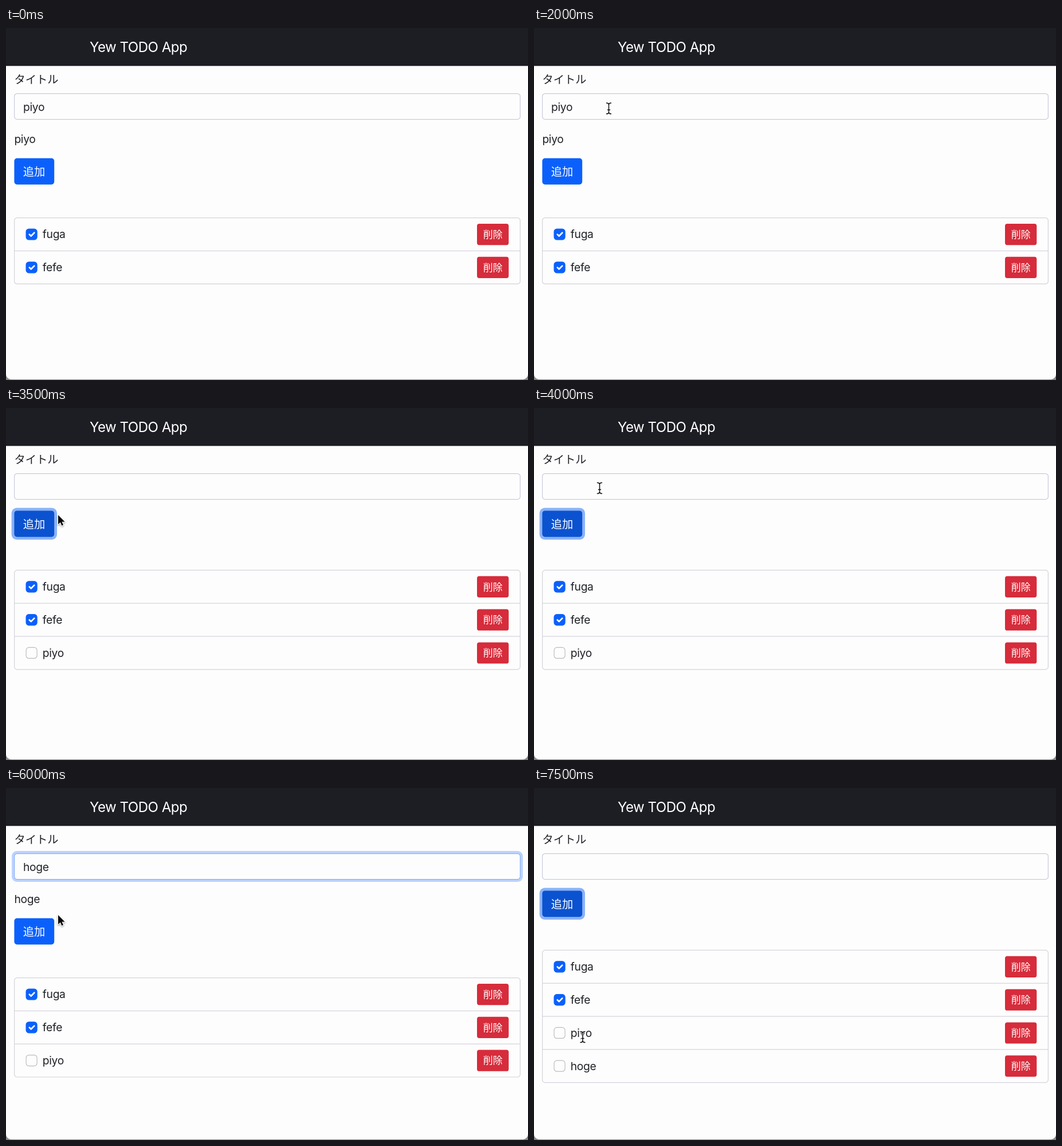
These frames come from a looping animation (911x615 px, 8000 ms). An HTML page with a canvas:

```html
<!DOCTYPE html>
<html lang="ja">
<head>
<meta charset="utf-8">
<title>Yew TODO App</title>
<style>
html, body { margin: 0; width: 100%; height: 100%; overflow: hidden; background: #fdfdfd; }
canvas { display: block; width: 911px; height: 615px; }
</style>
</head>
<body>
<canvas id="stage"></canvas>
<script>
const W = 911, H = 615, LOOP = 8000, STEP = 500;
const REM = 19.3, ROW = 57.8, SHIFT = 48.2;
const FONT = 'Inter, "Noto Sans CJK JP", "Noto Sans CJK", sans-serif';
const CJK = '"Noto Sans CJK JP", "Noto Sans CJK", sans-serif';
const INK = '#1f2126', BLUE = '#0b60fc', DARK_BLUE = '#0a52cf', RED = '#d62c3b';

const canvas = document.getElementById('stage');
const dpr = window.devicePixelRatio || 1;
canvas.width = W * dpr;
canvas.height = H * dpr;
const ctx = canvas.getContext('2d');

// Each entry overrides the state from its time on.
const steps = [
  [0, { title: 'piyo', items: ['fuga', 'fefe'], focus: 0, caret: false, hover: false, ring: false, cursor: null }],
  [1500, { cursor: ['beam', 130.5, 140.5] }],
  [2500, { focus: 1, caret: true }],
  [3000, { focus: 0.9, caret: false, hover: true, cursor: ['hand', 56, 240] }],
  [3500, { title: '', items: ['fuga', 'fefe', 'piyo'], focus: 0, ring: true, cursor: ['arrow', 91, 187] }],
  [4000, { cursor: ['beam', 114.5, 140] }],
  [4500, { focus: 1, caret: true, hover: false, ring: false }],
  [5500, { title: 'hoge', cursor: null }],
  [6000, { caret: false, cursor: ['arrow', 91, 222] }],
  [6500, { hover: true, cursor: ['hand', 56, 240] }],
  [7000, { title: '', items: ['fuga', 'fefe', 'piyo', 'hoge'], focus: 0, ring: true, cursor: ['arrow', 80, 268] }],
  [7500, { cursor: ['beam', 85, 435] }]
];

function stateAt(t) {
  const s = {};
  for (const [start, change] of steps) if (t >= start) Object.assign(s, change);
  return s;
}

function box(x, y, w, h, r, fill, stroke) {
  ctx.beginPath();
  ctx.roundRect(x, y, w, h, r);
  if (fill) { ctx.fillStyle = fill; ctx.fill(); }
  if (stroke) { ctx.strokeStyle = stroke; ctx.lineWidth = 1.2; ctx.stroke(); }
}

function text(str, x, y, size = REM, color = INK, family = FONT, spacing = -0.018) {
  ctx.font = `400 ${size}px ${family}`;
  ctx.letterSpacing = `${family === CJK ? 0 : size * spacing}px`;
  ctx.fillStyle = color;
  ctx.fillText(str, x, y);
}

function drawInput(s) {
  if (s.focus) box(10, 110, 892, 54, 9, `rgba(13,96,252,${0.27 * s.focus})`);
  box(14.6, 114.6, 882.8, 45, 4.8, '#fdfdfd', s.focus ? '#86b0f8' : '#c9cbdc');
  text(s.title, 30, 144.5);
  if (s.caret) {
    const x = s.title ? 31 + ctx.measureText(s.title).width : 30;
    ctx.fillStyle = '#111';
    ctx.fillRect(x, 126, 1.2, 23);
  }
}

function drawAdd(s, y) {
  if (s.ring) box(9.6, y - 4.8, 79.4, 55.4, 9, '#8bb2f8');
  box(14.4, y, 69.8, 45.8, 4.8, s.hover ? DARK_BLUE : BLUE);
  text('追加', 29.8, y + 30.3, REM, '#fff', CJK);
}

function drawCheckbox(x, y, on) {
  box(x, y, 19, 19, 4.8, on ? BLUE : '#fdfdfd', on ? BLUE : '#bdbdc2');
  if (!on) return;
  ctx.beginPath();
  ctx.moveTo(x + 5.7, y + 9.6);
  ctx.lineTo(x + 8.6, y + 12.5);
  ctx.lineTo(x + 14.2, y + 6.8);
  ctx.strokeStyle = '#fff';
  ctx.lineWidth = 2.7;
  ctx.lineCap = ctx.lineJoin = 'round';
  ctx.stroke();
}

function drawList(items, top) {
  box(14.6, top, 882.8, ROW * items.length, 4.8, null, '#d3d3dc');
  items.forEach((name, i) => {
    const y = top + ROW * i;
    if (i) {
      ctx.fillStyle = '#d3d3dc';
      ctx.fillRect(14.6, y - 0.6, 882.8, 1.2);
    }
    drawCheckbox(35.1, y + 19.4, i < 2);
    text(name, 63.8, y + 35.7);
    box(822, y + 10.4, 55.3, 37.2, 3.9, RED);
    text('削除', 832.8, y + 35.2, 16.9, '#fff', CJK);
  });
}

const arrowPath = new Path2D('M0 0V16.2L3.8 12.7L6.4 18.5L9 17.3L6.5 11.7H11.6Z');
const beamPath = new Path2D('M-4 -9.5Q-.5 -9.5 0 -7Q.5 -9.5 4 -9.5M0 -7V7M-4 9.5Q-.5 9.5 0 7Q.5 9.5 4 9.5M-2 2.5H2');
const handPath = new Path2D('M5 12L1.8 3.2Q1.2 1 3 .8Q4.3 .7 5 2.4L7.2 7.4Q8 5.9 9.6 7Q11 5.9 12.2 7.4Q13.8 6.3 15 8Q17.2 7.6 17.3 10Q17.4 14 15.5 17V19.3H7.8V17.7Q5.6 15.7 3.9 13Q1 11 1.5 9.5Q2.6 8.6 5 12Z');
const fingerPath = new Path2D('M9 11V16M11.5 11V16M14 11V16');

function drawCursor([kind, x, y]) {
  ctx.save();
  ctx.translate(x, y);
  ctx.lineCap = ctx.lineJoin = 'round';
  if (kind === 'beam') {
    ctx.strokeStyle = '#fff';
    ctx.lineWidth = 3.4;
    ctx.stroke(beamPath);
    ctx.strokeStyle = '#111';
    ctx.lineWidth = 1.5;
    ctx.stroke(beamPath);
  } else {
    const hand = kind === 'hand', path = hand ? handPath : arrowPath;
    ctx.shadowColor = 'rgba(0,0,0,.35)';
    ctx.shadowBlur = 3 * dpr;
    ctx.shadowOffsetY = 1.5 * dpr;
    ctx.strokeStyle = hand ? '#111' : '#fff';
    ctx.lineWidth = hand ? 1.4 : 2.2;
    ctx.stroke(path);
    ctx.shadowColor = 'transparent';
    ctx.fillStyle = hand ? '#fff' : '#080808';
    ctx.fill(path);
    if (hand) {
      ctx.stroke(path);
      ctx.stroke(fingerPath);
    }
  }
  ctx.restore();
}

function draw(t) {
  const s = stateAt(t), dy = s.title ? SHIFT : 0;
  ctx.setTransform(dpr, 0, 0, dpr, 0, 0);
  ctx.fillStyle = '#858585';
  ctx.fillRect(0, 0, W, H);
  box(0, -20, W, H + 19, 9, '#fdfdfd');
  ctx.fillStyle = '#1d1e24';
  ctx.fillRect(0, 0, W, 66.3);
  text('Yew TODO App', 146, 41.8, 24.1, '#fff', FONT, -0.022);
  text('タイトル', 14.4, 97.3, REM, INK, CJK);
  drawInput(s);
  if (s.title) text(s.title, 14.4, 201.2);
  drawAdd(s, 179.4 + dy);
  drawList(s.items, 283.4 + dy);
  if (s.cursor) drawCursor(s.cursor);
}

let start = null;
function tick(now) {
  if (start === null) start = now;
  const t = (now - start) % LOOP;
  draw(Math.floor(t / STEP) * STEP);
  requestAnimationFrame(tick);
}
draw(0);
requestAnimationFrame(tick);
</script>
</body>
</html>
```
